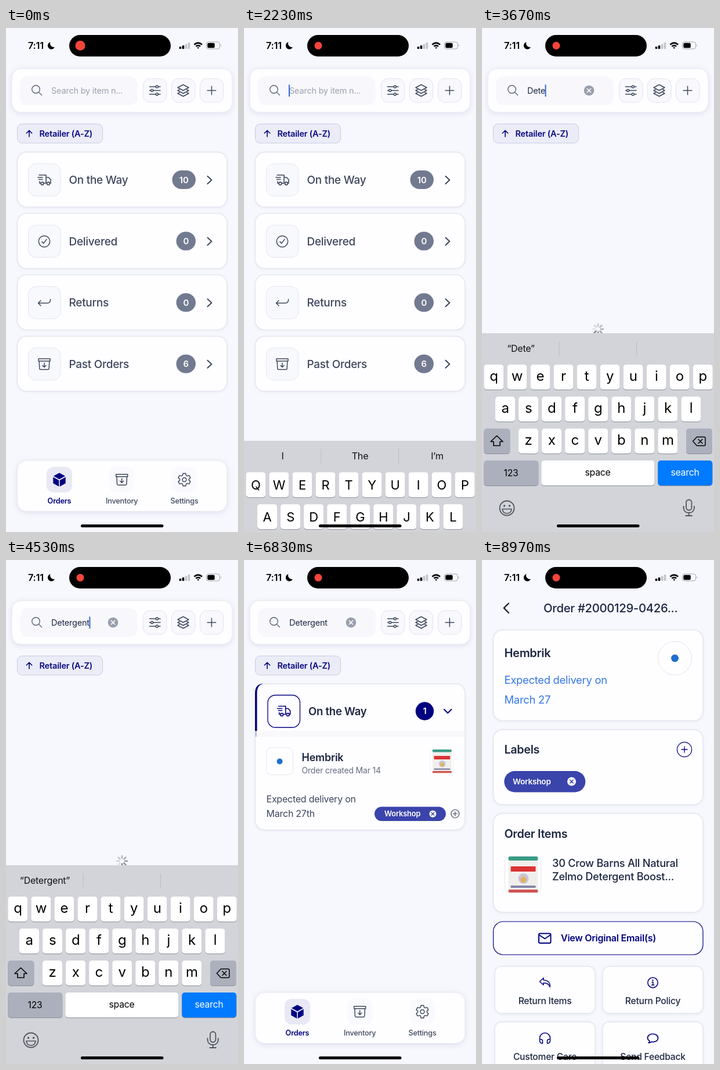
Animation of 400 by 867 pixels, one loop 9 s. Source, as an HTML page:

```html
<!DOCTYPE html>
<html lang="en">
<head>
<meta charset="utf-8">
<title>Order search</title>
<style>
html, body { margin: 0; width: 100%; height: 100%; overflow: hidden; background: #f7f8fd; }
svg { display: block; width: 100vw; height: 100vh; }
text { font-family: Inter, "Liberation Sans", sans-serif; letter-spacing: -.015em; white-space: pre; }
.line { fill: none; stroke-linecap: round; stroke-linejoin: round; }
.card { fill: #fefdff; stroke: #e3e5ef; stroke-width: 1.3; filter: drop-shadow(0 1px 2px rgba(60, 65, 130, .07)); }
.float { filter: drop-shadow(0 2px 5px rgba(60, 65, 130, .13)); }
.key { filter: drop-shadow(0 1px 0 #8b8e95); }
.page { filter: drop-shadow(-3px 0 5px rgba(30, 35, 80, .05)); }

/* hard switches */
.list, .spin, .result, .upper, .lower { animation: 9s step-end infinite; }
.list { animation-name: list; }
.spin { animation-name: spin; }
.result { animation-name: result; }
.upper { animation-name: upper; }
.lower { animation-name: lower; }
@keyframes list { 0% { opacity: 1 } 36.1%, 100% { opacity: 0 } }
@keyframes spin { 0% { opacity: 0 } 36.1% { opacity: 1 } 55%, 100% { opacity: 0 } }
@keyframes result { 0% { opacity: 0 } 55%, 100% { opacity: 1 } }
@keyframes upper { 0% { opacity: 1 } 33.9%, 100% { opacity: 0 } }
@keyframes lower { 0% { opacity: 0 } 33.9%, 100% { opacity: 1 } }

/* motion */
.spokes { animation: turn 1s steps(8) infinite; }
.board { animation: board 9s cubic-bezier(.38, .7, .125, 1) infinite; }
.under { animation: under 9s cubic-bezier(.2, .8, .2, 1) infinite; }
.page { animation: push 9s cubic-bezier(.2, .8, .2, 1) infinite; }
.rec { r: 6.5px; animation: rec 9s ease-out infinite; }
@keyframes turn { to { transform: rotate(360deg) } }
@keyframes board {
  0%, 23.9% { transform: translateY(345px) }
  28.4%, 69.4% { transform: none }
  73.8%, 100% { transform: translateY(345px) }
}
@keyframes under { 0%, 87.4% { transform: none } 94.07%, 100% { transform: translateX(-120px) } }
@keyframes push { 0%, 87.4% { transform: translateX(412px) } 94.07%, 100% { transform: none } }
@keyframes rec { 0%, 2% { r: 8.5px } 6%, 100% { r: 6.5px } }
</style>
</head>
<body>
<svg id="stage" viewBox="0 0 400 867"></svg>
<script>
const NAVY = '#000080', INK = '#1c2740', SLATE = '#3e475c', PILL = '#3a44ab', SHOP = '#1f6fce';
const WORD = 'Detergent', LOOP = 9000, TYPE_AT = 3050, TYPE_STEP = 165;

const text = (x, y, size, str, fill = INK, weight = 400, anchor = 'start') =>
  `<text x="${x}" y="${y}" font-size="${size}" fill="${fill}" font-weight="${weight}" text-anchor="${anchor}">${str}</text>`;
const mid = (x, y, size, str, fill, weight) => text(x, y, size, str, fill, weight, 'middle');
const rect = (x, y, w, h, r, attrs) => `<rect x="${x}" y="${y}" width="${w}" height="${h}" rx="${r}" ${attrs}/>`;
const circle = (x, y, r, attrs) => `<circle cx="${x}" cy="${y}" r="${r}" ${attrs}/>`;
const line = (d, color = SLATE, w = 1.5) => `<path class="line" d="${d}" stroke="${color}" stroke-width="${w}"/>`;
const ring = (x, y, r, color = SLATE, w = 1.5) => circle(x, y, r, `fill="none" stroke="${color}" stroke-width="${w}"`);
const at = (x, y, body, scale = 1) => `<g transform="translate(${x} ${y}) scale(${scale})">${body}</g>`;
const range = (n, fn) => Array.from({ length: n }, (_, i) => fn(i)).join('');
const card = (y, h, x = 19.5, w = 361.5, r = 16) => rect(x, y, w, h, r, 'class="card"');
const plus = (x, y, s, color, w) => line(`M${x - s} ${y}h${2 * s}M${x} ${y - s}v${2 * s}`, color, w);
const cross = (x, y, r, fill, mark) => circle(x, y, r, `fill="${fill}"`) +
  at(x, y, line('M-1 -1L1 1M1 -1L-1 1', mark, 1.5 / (r * .37)), r * .37);

function gear() {
  const pts = [];
  for (let k = 0; k < 6; k++)
    for (const [deg, r] of [[-23, 8], [-12, 11], [12, 11], [23, 8]]) {
      const a = (k * 60 - 90 + deg) * Math.PI / 180;
      pts.push(`${(r * Math.cos(a)).toFixed(2)} ${(r * Math.sin(a)).toFixed(2)}`);
    }
  return line(`M${pts.join('L')}Z`) + ring(0, 0, 3.4);
}

const icons = {
  truck: (c = SLATE) => line('M-9 -8.5H3V5.5H-.5M3 -4.5H7.5L11 -.5V5.5H9.7M-11 -4.5H-3M-9.5 -1H-3M-8 2.5V5.5H-6.5', c, 1.6) +
    ring(-3.5, 6, 2.4, c, 1.6) + ring(7, 6, 2.4, c, 1.6),
  check: () => ring(0, 0, 9.7) + line('M-4 .5L-1.2 3.3L4 -3.7'),
  back: () => line('M10.5 -6V-5Q10.5 .5 5 .5H-10.5M-6 -4L-10.5 .5L-6 5'),
  box: () => line('M-10 -9.3H10V-5.3H-10ZM-8.8 -5.3L-8.2 7.5Q-8 9.3 -6.2 9.3H6.2Q8 9.3 8.2 7.5L8.8 -5.3M0 -2V5M-3 2.2L0 5.2L3 2.2'),
  cube: () => `<path fill="${NAVY}" d="M0 -11.8L10 -6.2L0 -.7L-10 -6.2ZM-10.7 -4.6L-.8 .9V11.8L-10.7 6.2ZM10.7 -4.6L.8 .9V11.8L10.7 6.2Z"/>`,
  gear,
  reply: () => line('M-2.5 -8L-9 -1.8L-2.5 4V.5Q6 .3 8.7 7.5Q9.5 -4 -2.5 -4.3Z', NAVY),
  info: () => ring(0, 0, 8.7, NAVY) + line('M-1.5 -1H.3V4.2M-2 4.2H2.3', NAVY) + circle(0, -4, 1.2, `fill="${NAVY}"`),
  care: () => line('M-9 4V0A9 9 0 0 1 9 0V4M-8.7 2Q-4 1.5 -4 5V9Q-9 9 -9 4M8.7 2Q4 1.5 4 5V9Q9 9 9 4', NAVY),
  chat: () => line('M-5.3 5.2Q-9 2.8 -9 -.5C-9 -9.5 9 -9.5 9 -.5C9 5.8 2 7.2 -2 6.2Q-4.5 8.5 -7.5 8Q-5.3 7 -5.3 5.2Z', NAVY, 1.7),
};

// soft stand-in for a product picture, 62 units wide
const product = () => rect(0, 0, 62, 63, 8, 'fill="#fff" stroke="#e6e7ef"') +
  rect(6, 0, 51, 63, 4, 'fill="#f1efed"') + rect(6, 0, 51, 7, 3, 'fill="#399b84"') +
  rect(10, 17, 43, 9, 1, 'fill="#db3434"') + circle(32, 38, 9, 'fill="#c9c7d6"') +
  circle(32, 40, 5, 'fill="#e3b35b"') + rect(10, 50, 43, 4, 1, 'fill="#8388a8"') +
  rect(6, 57, 51, 5, 2, 'fill="#cf5350"');

const section = (icon, label, count, i) => {
  const w = count > 9 ? 40.5 : 33.5;
  return at(0, 213.5 + i * 105.6, card(0, 94.5) +
    rect(38.5, 20, 55.5, 55.5, 13, 'fill="#f8f9fd" stroke="#e5e7f1"') + at(66, 48, icons[icon]()) +
    text(108.5, 54.5, 19, label, SLATE, 500) + rect(327 - w, 31.5, w, 32, 16, 'fill="#727a90"') +
    mid(327 - w / 2, 53, 15, count, '#fff', 600) + line('M347.5 41.5L354.5 48L347.5 54.5', SLATE, 2));
};

const searchBar = () => rect(10, 70, 380, 75, 16, 'class="float" fill="#fefdff" stroke="#e8e9f2"') +
  rect(24, 83, 203, 49.5, 14, 'fill="#f8f8fc"') + ring(51.5, 105.5, 6.8, '#5b6478', 1.4) + line('M56.5 110.5L61.5 115.5', '#5b6478', 1.4) +
  range(3, i => rect(236.5 + i * 49, 87, 40.5, 41, 12, 'fill="#f8f8fd" stroke="#e3e4ef"')) +
  line('M247.5 101H258M262.5 101H266M247.5 107.5H249.5M254 107.5H266M247.5 114H258M262.5 114H266') +
  ring(260.3, 101, 2) + ring(251.7, 107.5, 2) + ring(260.3, 114, 2) +
  line('M296 102.5L305.5 97.5L315 102.5L305.5 107.5ZM299 106L296 107.5L305.5 112.5L315 107.5L312 106M299 111L296 112.5L305.5 117.5L315 112.5L312 111') +
  plus(354.5, 107.5, 7.3) +
  '<g id="hint">' + text(78, 113, 14.5, 'Search by item n...', '#9ba1b1') + '</g>' +
  '<text id="typed" x="78" y="113" font-size="14.5" fill="#1c2740"></text>' +
  '<rect id="caret" y="97.5" width="2" height="20.5" fill="#3567dc"/>' +
  '<g id="clear">' + cross(184.5, 107.5, 8.8, '#999fae', '#fff') + '</g>';

const chip = () => rect(19.5, 165, 147, 33, 8, 'fill="#ebecf7" stroke="#c9cbe4"') +
  line('M40 187V176.5M35.3 181L40 176.3L44.7 181', NAVY, 1.6) + text(57.5, 186.5, 14.6, 'Retailer (A-Z)', '#0a0a80', 600);

const tabs = () => rect(19.5, 744, 361.5, 87.5, 16, 'class="float" fill="#fefdff" stroke="#e8e9f2"') +
  [['cube', 'Orders', 92], ['box', 'Inventory', 199.7], ['gear', 'Settings', 307.5]].map(([icon, label, x], i) =>
    rect(x - 22, 755, 44, 44, 12, `fill="${i ? '#fafafe' : '#e8e9f4'}"`) + at(x, 777, icons[icon]()) +
    mid(x, 817.5, 12.7, label, i ? SLATE : NAVY, i ? 500 : 600)).join('');

const result = () => card(213, 251.5) +
  rect(22, 294, 358, 10, 0, 'fill="#f9f9fc"') + rect(19, 294, 3, 10, 0, 'fill="#c2c4d8"') +
  `<path d="M19 294V229Q19 213 33 212.7Q22.5 215 22.5 229V294Z" fill="${NAVY}"/>` +
  rect(41, 232.5, 55.5, 55.5, 13, `fill="#fefdff" stroke="${NAVY}" stroke-width="1.3"`) + at(68.7, 260, icons.truck(NAVY)) +
  text(111, 267, 18.6, 'On the Way', INK, 600) + circle(311.5, 260, 15.7, `fill="${NAVY}"`) + mid(311.5, 265.3, 15, 1, '#fff', 600) +
  line('M345 257L351.3 263.3L357.6 257', NAVY, 2) +
  rect(38.5, 323, 46, 46.5, 9, 'fill="#fff" stroke="#e6e7ef"') + circle(61.5, 346.5, 5, `fill="${SHOP}"`) +
  text(99.5, 345.5, 18, 'Hembrik', INK, 600) + text(99.5, 367, 14, 'Order created Mar 14', '#646c81') + at(321, 326, product(), .65) +
  text(38.5, 416.5, 16, 'Expected delivery on', SLATE) + text(38.5, 442, 16, 'March 27th', SLATE) +
  rect(225, 424.5, 123, 24.5, 12.2, `fill="${PILL}"`) + text(242, 441.3, 12.9, 'Workshop', '#fff', 600) +
  cross(325.5, 436.7, 6, '#fff', PILL) + ring(364, 436.5, 7, SLATE, 1.2) + plus(364, 436.5, 3.5, SLATE, 1.2);

const spinner = () => at(200, 518, '<g class="spokes">' + range(8, i =>
  `<path d="M0 -4.8V-9" class="line" stroke="#777a82" stroke-width="2.5" opacity="${.2 + i * .11}" transform="rotate(${i * 45 + 45})"/>`) + '</g>');

const cap = (x, y, w, fill = '#fff') => rect(x, y, w, 43, 5, `class="key" fill="${fill}"`);
const rows = [['qwertyuiop', 3.3, 579], ['asdfghjkl', 23, 634], ['zxcvbnm', 63, 689]];
const eachKey = fn => rows.map(([keys, x, y]) => range(keys.length, i => fn(x + i * 40.05, y, keys[i]))).join('');
const shiftKey = 'M25.5 701.5L36 711.5H31V718.5H20V711.5H15Z';

const keyboard = () => rect(0, 525, 400, 345, 0, 'fill="#d2d4da"') +
  line('M133 539.5V563M266.5 539.5V563', '#b9bcc4', 1) + eachKey((x, y) => cap(x, y, 34)) +
  '<g class="upper">' + eachKey((x, y, k) => mid(x + 17, y + 29.8, 22, k.toUpperCase(), '#000')) +
  cap(3.3, 689, 45) + `<path d="${shiftKey}" stroke="#000" stroke-width="1.5" stroke-linejoin="round"/></g>` +
  '<g class="lower">' + eachKey((x, y, k) => mid(x + 17, y + 28, 24, k, '#000')) +
  cap(3.3, 689, 45, '#abb0bc') + line(shiftKey, '#000', 1.6) + '</g>' +
  cap(352, 689, 45, '#abb0bc') + line('M370.5 703.5H383Q385 703.5 385 705.5V716.5Q385 718.5 383 718.5H370.5L363.5 711ZM373 707.5L380 714.5M380 707.5L373 714.5', '#000') +
  cap(3.3, 744, 94, '#abb0bc') + mid(50, 771, 15.6, '123', '#000') + cap(102.3, 744, 195) + mid(199.5, 770, 15.8, 'space', '#000') +
  cap(303.3, 744, 94, '#007aff') + mid(350, 770, 15.8, 'search', '#fff') +
  ring(43, 826, 12.5, '#50545c', 1.8) + circle(38.5, 822, 1.7, 'fill="#50545c"') + circle(47.5, 822, 1.7, 'fill="#50545c"') +
  '<path d="M35 827.5H51Q50 835 43 835T35 827.5Z" fill="none" stroke="#50545c" stroke-width="1.7"/>' +
  rect(352, 811.5, 9.5, 18, 4.7, 'fill="none" stroke="#50545c" stroke-width="1.8"') +
  line('M347.5 823V825Q348 834 356.7 834T366 825V823M356.7 834V839M351.5 839H362', '#50545c', 1.8) +
  '<g id="words">' + mid(66.5, 557, 16.2, 'I', '#111') + mid(200, 557, 16.2, 'The', '#111') + mid(333, 557, 16.2, 'I’m', '#111') + '</g>' +
  '<text id="quote" x="67" y="557" font-size="16" text-anchor="middle" fill="#111"></text>';

const tile = (x, y, icon, label) => card(y, 81, x, 173, 12) + at(x + 86.5, y + 28, icons[icon]()) + mid(x + 86.5, y + 65, 15.6, label, INK, 500);

const detail = () => rect(0, 0, 400, 867, 0, 'fill="#f7f8fd"') +
  line('M46 74.5L37.8 82.7L46 91', INK, 2.4) + text(106, 90, 20.3, 'Order #2000129-0426...', INK, 500) +
  card(120.5, 156) + text(38.5, 167, 20, 'Hembrik', INK, 600) + circle(332.5, 169, 29, 'fill="#fefefe" stroke="#e2e4ee"') + circle(332.5, 169, 6.5, `fill="${SHOP}"`) +
  text(38.5, 212.5, 18.4, 'Expected delivery on', '#3478e6') + text(38.5, 246.7, 18.4, 'March 27', '#3478e6') +
  card(292, 129) + text(38.5, 333, 19.7, 'Labels', INK, 600) + ring(349, 326, 12.6, NAVY, 1.2) + plus(349, 326, 5, NAVY, 1.3) +
  rect(38.3, 363, 140, 36.5, 18.2, `fill="${PILL}"`) + text(53, 385.5, 13.6, 'Workshop', '#fff', 600) + cross(154.5, 381, 7.5, '#fff', PILL) +
  card(436, 170) + text(38.5, 478, 19.7, 'Order Items', INK, 600) + at(39.5, 510, product()) +
  text(121, 527.5, 18.2, '30 Crow Barns All Natural', INK, 500) + text(121, 550.5, 18.2, 'Zelmo Detergent Boost...', INK, 500) +
  rect(19.5, 622, 361.5, 57, 17, `fill="#fefdff" stroke="${NAVY}" stroke-width="1.2"`) +
  rect(98, 642.5, 20.5, 16.5, 2, `fill="none" stroke="${NAVY}" stroke-width="2"`) + line('M98.5 645L108.3 651.5L118 645', NAVY, 2) +
  text(136, 656, 16, 'View Original Email(s)', NAVY, 600) +
  tile(22, 699, 'reply', 'Return Items') + tile(208, 699, 'info', 'Return Policy') +
  tile(22, 794.5, 'care', 'Customer Care') + tile(208, 794.5, 'chat', 'Send Feedback');

const statusBar = () => text(38, 36, 16.3, '7:11', '#000', 600) +
  '<path d="M76.5 24.2A6.3 6.3 0 1 0 84 32.8A6.5 6.5 0 0 1 76.5 24.2Z"/>' +
  rect(109, 12, 175, 37, 18.5, '') + '<circle class="rec" cx="128" cy="30.3" fill="#f5453a"/>' +
  [4, 6, 8.5, 11].map((h, i) => rect(298.7 + i * 5, 36 - h, 3.6, h, 1, `fill="${i < 2 ? '#000' : '#c3c4ca'}"`)).join('') +
  '<path d="M323.5 27.7Q331.3 20.8 339 27.7L337.2 29.6Q331.3 24.5 325.3 29.6ZM326.5 30.8Q331.3 26.7 336 30.8L334.2 32.6Q331.3 30.2 328.3 32.6ZM329.3 33.7Q331.3 32.2 333.2 33.7L331.3 35.8Z"/>' +
  rect(345.5, 24, 23, 12, 3.8, 'fill="none" stroke="#a2a3a9"') + rect(347.3, 25.8, 12.5, 8.4, 2.2, '') +
  '<path d="M370 28Q372 30 370 32Z" fill="#a2a3a9"/>';

const $ = id => document.getElementById(id);
$('stage').innerHTML =
  '<g class="under">' + searchBar() + chip() +
  '<g class="list">' + section('truck', 'On the Way', 10, 0) + section('check', 'Delivered', 0, 1) +
  section('back', 'Returns', 0, 2) + section('box', 'Past Orders', 6, 3) + '</g>' +
  '<g class="spin">' + spinner() + '</g><g class="result">' + result() + '</g>' + tabs() + '</g>' +
  '<g class="board">' + keyboard() + '</g><g class="page">' + detail() + '</g>' +
  statusBar() + rect(129, 854, 142.5, 5, 2.5, '');

const show = (id, on) => $(id).setAttribute('visibility', on ? 'visible' : 'hidden');

function draw(t) {
  const n = Math.max(0, Math.min(WORD.length, Math.floor((t - TYPE_AT) / TYPE_STEP) + 1));
  const typed = WORD.slice(0, n), lastKey = n ? TYPE_AT + (n - 1) * TYPE_STEP : 2150;
  $('typed').textContent = typed;
  $('quote').textContent = n ? `“${typed}”` : '';
  $('caret').setAttribute('x', n ? 78 + $('typed').getComputedTextLength() - .5 : 77);
  show('hint', !n);
  show('words', !n);
  show('clear', n);
  show('caret', t >= 2150 && t < 6250 && (t - lastKey) % 1000 < 500);
}

let start;
function tick(now) {
  start ??= now;
  draw((now - start) % LOOP);
  requestAnimationFrame(tick);
}
requestAnimationFrame(tick);
</script>
</body>
</html>
```
